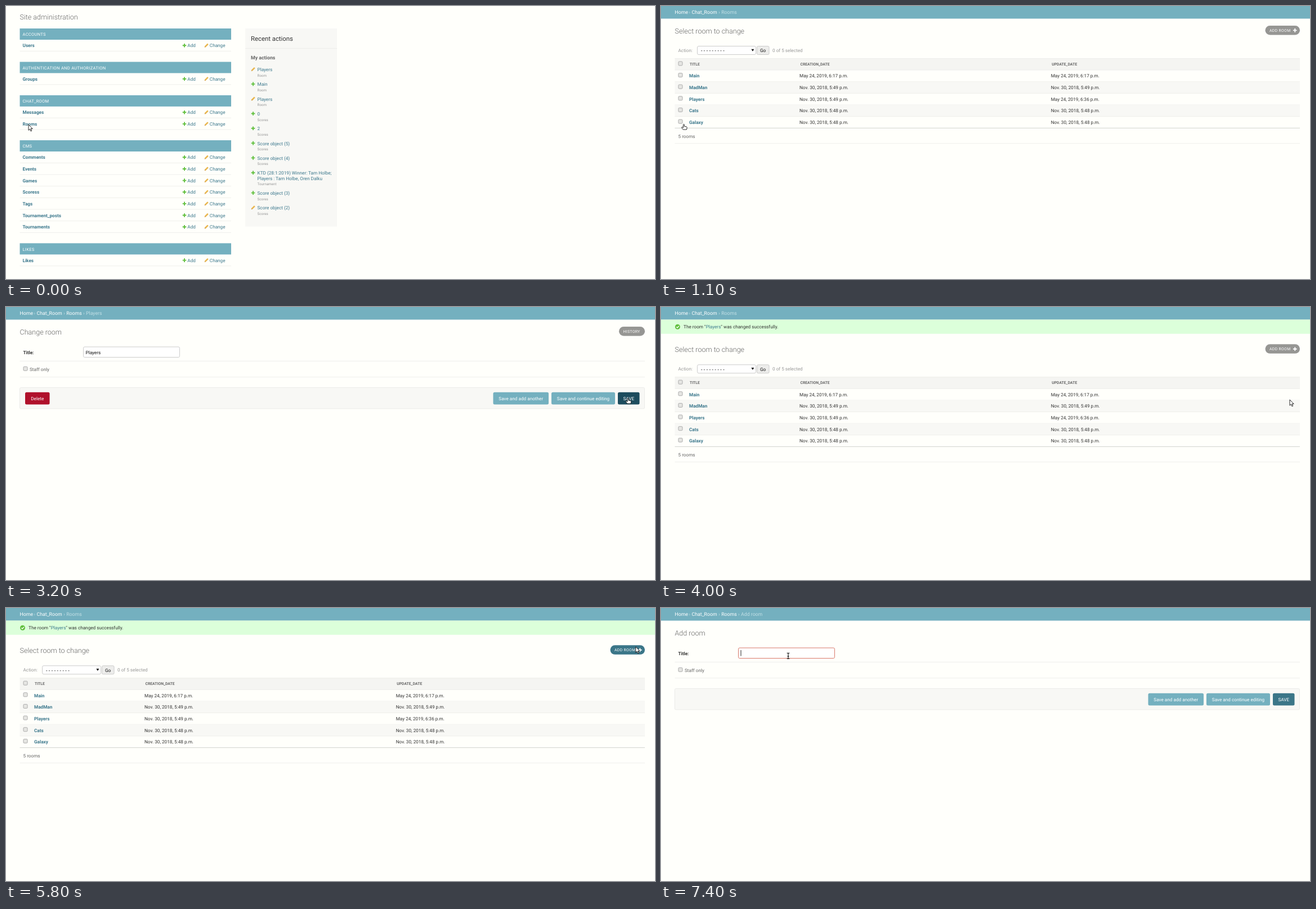
An HTML page for the animation above (8000 ms loop, 1153 px wide and 486 px high).

```html
<!DOCTYPE html>
<html lang="en">
<head>
<meta charset="utf-8">
<title>Site administration</title>
<style>
  html, body { margin: 0; width: 100%; height: 100%; overflow: hidden; background: #fffffb; }
  svg { display: block; width: 100vw; height: 100vh; }
  text { font-family: Roboto, sans-serif; text-rendering: geometricPrecision; white-space: pre; }
</style>
</head>
<body>
<svg viewBox="0 0 1153 486"><g id="page"></g><g id="cursor"></g></svg>
<script>
const LOOP = 8000, STEP = 100;
const BODY = 8.2, SMALL = 6.9, CRUMB = 8.75, TITLE = 12.55;
const ROW = 20.65, LEFT = 24.5, RIGHT = 1135;
const C = {
  teal: '#74b0bf', link: '#3c788d', linkHover: '#0c3b4f', deep: '#3b7688', deepHover: '#1d4c5d',
  text: '#333', muted: '#666', pale: '#999', panel: '#f8f8f5', line: '#ebebe8', border: '#ccc',
  green: '#62c03f', yellow: '#e9b64e', pill: '#969693', crumb: '#c3e0e6'
};

// Text is placed by the vertical centre of its capitals.
const text = (x, cy, str, fill = C.text, size = BODY, weight = 400, extra = '') =>
  `<text x="${x}" y="${cy + size * 0.355}" fill="${fill}" font-size="${size}" font-weight="${weight}" ${extra}>${str}</text>`;
const bold = (x, cy, str, fill = C.link, extra) => text(x, cy, str, fill, BODY, 700, extra);
const spaced = (x, cy, str, fill, size) => text(x, cy, str, fill, size, 400, 'letter-spacing=".31"');
const rect = (x1, y1, x2, y2, fill, r = 0, stroke = 'none') =>
  `<rect x="${x1}" y="${y1}" width="${x2 - x1}" height="${y2 - y1}" rx="${r}" fill="${fill}" stroke="${stroke}"/>`;
const path = (d, stroke, width = 1, fill = 'none') =>
  `<path d="${d}" stroke="${stroke}" stroke-width="${width}" fill="${fill}"/>`;
const rule = (x1, x2, y, color = C.line) => path(`M${x1} ${y}H${x2}`, color, 0.8);
const plus = (x, y, color = C.green) => path(`M${x - 3.3} ${y}h6.6M${x} ${y - 3.3}v6.6`, color, 1.9);
const pencil = (x, y) => path(`M${x - 2.3} ${y + 2.3}L${x + 2.8} ${y - 2.8}`, C.yellow, 2.6) +
  path(`M${x - 3.4} ${y + 3.4}l.5 -2 1.5 1.5z`, 'none', 0, '#c99a4a');
const checkbox = cy => rect(31, cy - 3.5, 38, cy + 3.5, '#e6e6e3', 1.3, '#aaa');
const hoverLink = (x, cy, str, hover, underline = hover) =>
  bold(x, cy, str, hover ? C.linkHover : C.link, underline ? 'text-decoration="underline"' : '');

const modules = [
  ['ACCOUNTS', 'Users'],
  ['AUTHENTICATION AND AUTHORIZATION', 'Groups'],
  ['CHAT_ROOM', 'Messages', 'Rooms'],
  ['CMS', 'Comments', 'Events', 'Games', 'Scoress', 'Tags', 'Tournament_posts', 'Tournaments'],
  ['LIKES', 'Likes']
];
const actions = [
  ['Players', 'Room', true], ['Main', 'Room'], ['Players', 'Room', true], ['0', 'Scores'], ['2', 'Scores'],
  ['Score object (5)', 'Scores'], ['Score object (4)', 'Scores'],
  ['KTD (28:1:2019) Winner: Tam Holbe;|Players : Tam Holbe, Oren Dalku', 'Tournament'],
  ['Score object (3)', 'Scores'], ['Score object (2)', 'Scores', true]
];
const rooms = [
  ['Main', 'May 24, 2019, 6:17 p.m.', 'May 24, 2019, 6:17 p.m.'],
  ['MadMan', 'Nov. 30, 2018, 5:49 p.m.', 'Nov. 30, 2018, 5:49 p.m.'],
  ['Players', 'Nov. 30, 2018, 5:49 p.m.', 'May 24, 2019, 6:36 p.m.'],
  ['Cats', 'Nov. 30, 2018, 5:48 p.m.', 'Nov. 30, 2018, 5:48 p.m.'],
  ['Galaxy', 'Nov. 30, 2018, 5:48 p.m.', 'Nov. 30, 2018, 5:48 p.m.']
];

function indexPage(t) {
  let out = text(LEFT, 19.7, 'Site administration', C.muted, TITLE, 300), top = 40;
  for (const [caption, ...models] of modules) {
    out += rect(LEFT, top, 400, top + 20, C.teal) + spaced(29.5, top + 10.5, caption, '#fff', 7.5);
    models.forEach((model, i) => {
      const cy = top + 30.5 + ROW * i;
      out += hoverLink(29.5, cy, model, model === 'Rooms' && t >= 500, model === 'Rooms' && t >= 600) +
        plus(317, cy - 0.2) + text(322.3, cy, 'Add', C.link) +
        pencil(356, cy - 0.2) + text(361.8, cy, 'Change', C.link) + rule(LEFT, 400, cy + 9.9);
    });
    top += 38.8 + ROW * models.length;
  }
  out += rect(425, 40, 588, 392.5, C.panel) + text(435, 58.3, 'Recent actions', C.text, 11.35) +
    rule(425, 588, 75.5) + text(435, 92.2, 'My actions', C.muted, 8.8, 700);
  let cy = 113.2;
  for (const [title, kind, changed] of actions) {
    out += (changed ? pencil : plus)(439, cy - 0.6);
    title.split('|').forEach((part, i) => {
      if (i) cy += 9.6;
      out += text(446.5, cy, part, C.link);
    });
    out += text(446.5, cy + 10.2, kind, C.pale, 6.3);
    cy += 26.3;
  }
  return out;
}

function breadcrumbs(last) {
  const steps = [[24.5, 'Home'], [54.5, 'Chat_Room'], [107.2, 'Rooms'], [142, last]].filter(s => s[1]);
  return rect(0, 0, 1153, 22.5, C.teal) + steps.map(([x, name], i) =>
    text(x, 11.2, name, i === steps.length - 1 ? C.crumb : '#fff', CRUMB) +
    (i ? text(x - 4.9, 11.2, '›', C.crumb, CRUMB) : '')).join('');
}

function listPage({ message, hoverRoom, hoverAdd }) {
  let out = text(LEFT, 44.2, 'Select room to change', C.muted, TITLE, 300) +
    rect(1073.5, 35, RIGHT, 51.5, hoverAdd ? C.deep : C.pill, 8.2) +
    spaced(1081, 43.5, 'ADD ROOM', '#fff', SMALL) + plus(1126.3, 43.4, '#fff') +
    text(30.5, 79.1, 'Action:', C.pale) + rect(64.5, 71.5, 168.5, 86.5, '#fff', 2.5, C.border) +
    text(69.7, 79.3, '---------', '#000', BODY, 400, 'style="font-family:\'Liberation Mono\',monospace"') +
    path('M160.4 76.8h5l-2.5 4z', 'none', 0, '#111') +
    rect(170.5, 71.5, 192, 86.5, '#ededeb', 2, C.border) + text(176, 79.3, 'Go', '#111') +
    text(198, 79.1, '0 of 5 selected', C.pale) +
    rect(LEFT, 93.3, RIGHT, 114, '#f5f5f2') + rule(LEFT, RIGHT, 93.5) + rule(LEFT, RIGHT, 114) + checkbox(102.4);
  [[51, 'TITLE'], [247.5, 'CREATION_DATE'], [694.2, 'UPDATE_DATE']].forEach(([x, name]) =>
    out += text(x, 103.7, name, C.muted, 6.8, 700));
  rooms.forEach(([name, created, updated], i) => {
    const cy = 124.4 + ROW * i;
    if (i % 2) out += rect(LEFT, cy - 10.1, RIGHT, cy + 10.3, C.panel);
    out += checkbox(cy - 1.4) + hoverLink(50, cy, name, hoverRoom && name === 'Players') +
      text(246, cy, created) + text(692.7, cy, updated) +
      rule(LEFT, RIGHT, cy + 10.3, i === 4 ? '#c6c8c4' : C.line);
  });
  out += text(30.5, 231.6, '5 rooms', C.muted) + rule(LEFT, RIGHT, 244.6);
  const notice = message ? rect(0, 22.5, 1153, 47.7, '#dcffda') +
    `<circle cx="29.5" cy="35.2" r="4.5" fill="${C.green}"/>` + path('M27.3 35.3l1.7 1.7 3-3.3', '#fff', 1.3) +
    text(40, 35.5, `The room "<tspan fill="${C.link}">Players</tspan>" was changed successfully.`) : '';
  return breadcrumbs() + notice + `<g transform="translate(0 ${message ? 31.3 : 0})">${out}</g>`;
}

function formPage({ adding, hover, focus }) {
  const button = (x1, x2, label, fill) => rect(x1, 151.8, x2, 173.5, fill, 2.5) +
    text((x1 + x2) / 2, 162.8, label, '#fff', BODY, 400, 'text-anchor="middle"');
  return breadcrumbs(adding ? 'Add room' : 'Players') +
    text(LEFT, 44.2, adding ? 'Add room' : 'Change room', C.muted, TITLE, 300) +
    (adding ? '' : rect(1089, 35, RIGHT, 51.5, C.pill, 8.2) + spaced(1096.5, 43.5, 'HISTORY', '#fff', SMALL)) +
    bold(30.5, 80.6, 'Title:', C.text) +
    rect(137.5, 71, 308.5, 89.5, '#fff', 2.2, adding ? '#d9796a' : C.border) +
    (adding ? path('M142 75v10.5', '#111', 0.9) : text(141.5, 80.6, 'Players', '#111')) +
    rule(LEFT, RIGHT, 96.3) + checkbox(109.8) + text(42, 110.8, 'Staff only', C.muted) + rule(LEFT, RIGHT, 124.7) +
    rect(LEFT, 143.5, 1134.5, 181, C.panel, 2, C.line) +
    (adding ? '' : button(34, 77.5, 'Delete', '#b0112b')) +
    button(865.5, 964, 'Save and add another', C.teal) +
    button(969, 1082, 'Save and continue editing', hover === 'continue' ? '#5e9bad' : C.teal) +
    button(1087, 1125.5, 'SAVE', hover === 'save' ? C.deepHover : C.deep) +
    (focus ? rect(1086.8, 151.3, 1125.7, 174, 'none', 2.5, '#7fb2e0') : '');
}

function pageAt(t) {
  if (t < 1100) return indexPage(t);
  if (t < 2600) return listPage({ hoverRoom: t >= 1900 });
  if (t < 3900) return formPage({ hover: t >= 3200 ? 'save' : t >= 3100 ? 'continue' : '', focus: t >= 3600 });
  if (t < 6200) return listPage({ message: true, hoverAdd: t >= 5400 });
  return formPage({ adding: true });
}

const shapes = {
  arrow: path('M0 0V10.3L2.4 8.1 4 11.9 5.7 11.2 4.1 7.5H7.2Z', '#111', 0.9, '#fff'),
  hand: path('M-1 1Q0 -.4 1 1V4.2L4.9 5Q5.9 5.4 5.7 6.8L5 10H-1.2L-3.9 6.6Q-3.9 5.2 -2.5 5.6L-1 6.6Z', '#111', 0.9, '#fff'),
  beam: path('M-2.4 -5H-.6L0 -4.4 .6 -5H2.4M0 -4.4V4.4M-2.4 5H-.6L0 4.4 .6 5H2.4M-1.4 .8H1.4', '#111', 1.1)
};
// Pointer stops: time, x, y and the shape shown from then on.
const stops = [
  [0, 40, 211, 'arrow'], [500, 40.5, 210, 'hand'], [1500, 40.5, 210, 'hand'], [1600, 42, 205, 'arrow'],
  [1900, 60, 172, 'hand'], [2000, 63, 166, 'hand'], [2200, 63, 166, 'hand'], [2300, 74, 169, 'arrow'],
  [2400, 107.5, 178, 'arrow'], [2700, 470, 186, 'arrow'], [3100, 1050, 161, 'hand'], [3200, 1105, 162, 'hand'],
  [3400, 1117, 165, 'hand'], [3600, 1117, 165, 'arrow'], [4100, 1117, 165, 'arrow'], [4300, 915, 189, 'arrow'],
  [4400, 915, 189, 'arrow'], [4800, 54.5, 140, 'arrow'], [5300, 1078, 63, 'arrow'], [5400, 1105, 70, 'hand'],
  [5600, 1119, 69, 'hand'], [5800, 1118.7, 69, 'arrow'], [6300, 1118.7, 69, 'arrow'], [6800, 620, 161, 'arrow'],
  [7200, 221, 112, 'arrow'], [7300, 224, 92, 'arrow'], [7400, 226, 85.3, 'beam'], [LOOP, 226, 85.3, 'beam']
];
function cursorAt(t) {
  const i = stops.findIndex(s => s[0] > t);
  const [t0, x0, y0, shape] = stops[i - 1], [t1, x1, y1] = stops[i];
  const k = (t - t0) / (t1 - t0);
  return `<g transform="translate(${x0 + (x1 - x0) * k} ${y0 + (y1 - y0) * k})">${shapes[shape]}</g>`;
}

const page = document.getElementById('page'), cursor = document.getElementById('cursor');
const start = performance.now();
let shown = -1;
function frame() {
  const t = Math.floor((performance.now() - start) % LOOP / STEP) * STEP;
  if (t !== shown) {
    page.innerHTML = pageAt(t);
    cursor.innerHTML = cursorAt(t);
    shown = t;
  }
  requestAnimationFrame(frame);
}
frame();
</script>
</body>
</html>
```
